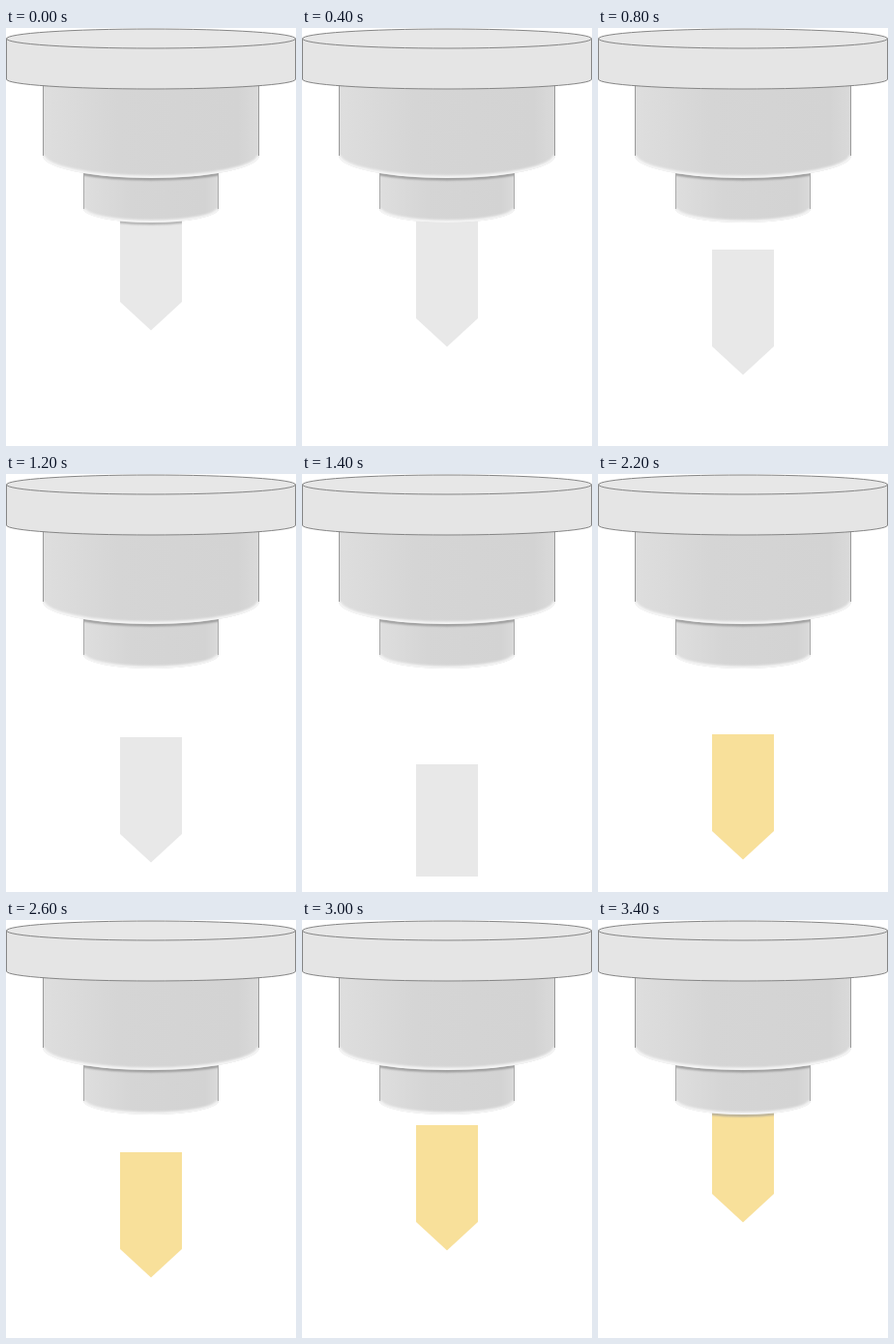
These frames come from a looping animation (300x432 px, 3.6 s). An HTML page:

```html
<!DOCTYPE html>
<html lang="en">
<head>
<meta charset="utf-8">
<title>Nozzle</title>
<style>
  html, body { margin: 0; width: 100%; height: 100%; overflow: hidden; background: #fff; }
  svg { display: block; }
</style>
</head>
<body>
<svg width="300" height="432" viewBox="0 0 300 432">
  <defs>
    <linearGradient id="metal">
      <stop offset="0" stop-color="#dedede"/>
      <stop offset=".35" stop-color="#d5d5d5"/>
      <stop offset=".9" stop-color="#d3d3d3"/>
      <stop offset="1" stop-color="#dadada"/>
    </linearGradient>
    <filter id="soft" x="-10%" y="-50%" width="120%" height="200%"><feGaussianBlur stdDeviation="1.2"/></filter>
    <path id="wide" d="M38 55V132A112 23 0 0 0 262 132V55Z"/>
    <path id="narrow" d="M80 140V187A70 14 0 0 0 220 187V140Z"/>
    <clipPath id="inWide"><use href="#wide"/></clipPath>
    <clipPath id="inNarrow"><use href="#narrow"/></clipPath>
    <clipPath id="column"><path d="M118 190H182V210H118Z"/></clipPath>
  </defs>

  <path id="arrow"/>
  <g id="shade" clip-path="url(#column)">
    <path d="M80 188A70 14 0 0 0 220 188" fill="none" stroke="#999" stroke-width="2" filter="url(#soft)"/>
  </g>

  <use href="#narrow" fill="url(#metal)"/>
  <g clip-path="url(#inNarrow)" fill="none">
    <path d="M80 187A70 14 0 0 0 220 187" stroke="#f6f6f6" stroke-width="5" filter="url(#soft)"/>
    <path d="M38 133A112 23 0 0 0 262 133" stroke="#8c8c8c" stroke-width="2.5" filter="url(#soft)"/>
    <path d="M80 140V187M220 140V187" stroke="#aaa" stroke-width="2"/>
  </g>

  <use href="#wide" fill="url(#metal)"/>
  <g clip-path="url(#inWide)" fill="none">
    <path d="M38 132A112 23 0 0 0 262 132" stroke="#f6f6f6" stroke-width="5" filter="url(#soft)"/>
    <path d="M38 55V132M262 55V132" stroke="#999" stroke-width="2"/>
  </g>

  <g stroke="#858585">
    <path d="M.5 11V53A149.5 10 0 0 0 299.5 53V11Z" fill="#e5e5e5"/>
    <ellipse cx="150" cy="11" rx="149.5" ry="10" fill="#e7e7e7"/>
  </g>
</svg>
<script>
const STEP = 200;
const GREY = '#e8e8e8', GOLD = '#f8e09a';
const arrow = document.getElementById('arrow');
const shade = document.getElementById('shade');

// One pose per step: colour, top edge, and a flat bottom edge where there is no tip.
const pose = (color, top, bottom) => ({ color, top, bottom });
const poses = [
  ...[183, 186, 200, 214, 229, 257, 272].map(y => pose(GREY, y)),
  pose(GREY, 300, 416),
  pose(GREY, 367, 416),
  null,
  pose(GOLD, 356, 424),
  ...[269, 255, 240, 226, 212, 198, 183].map(y => pose(GOLD, y))
];

function outline({ top, bottom }) {
  const end = bottom ? `V${bottom}H118Z` : `V${top + 100}L150 ${top + 129.5}L118 ${top + 100}Z`;
  return `M118 ${top}H182${end}`;
}

function draw() {
  const current = poses[Math.floor(performance.now() / STEP) % poses.length];
  arrow.setAttribute('d', current ? outline(current) : '');
  arrow.setAttribute('fill', current ? current.color : 'none');
  shade.setAttribute('visibility', current && current.top < 200 ? 'visible' : 'hidden');
  requestAnimationFrame(draw);
}
draw();
</script>
</body>
</html>
```
